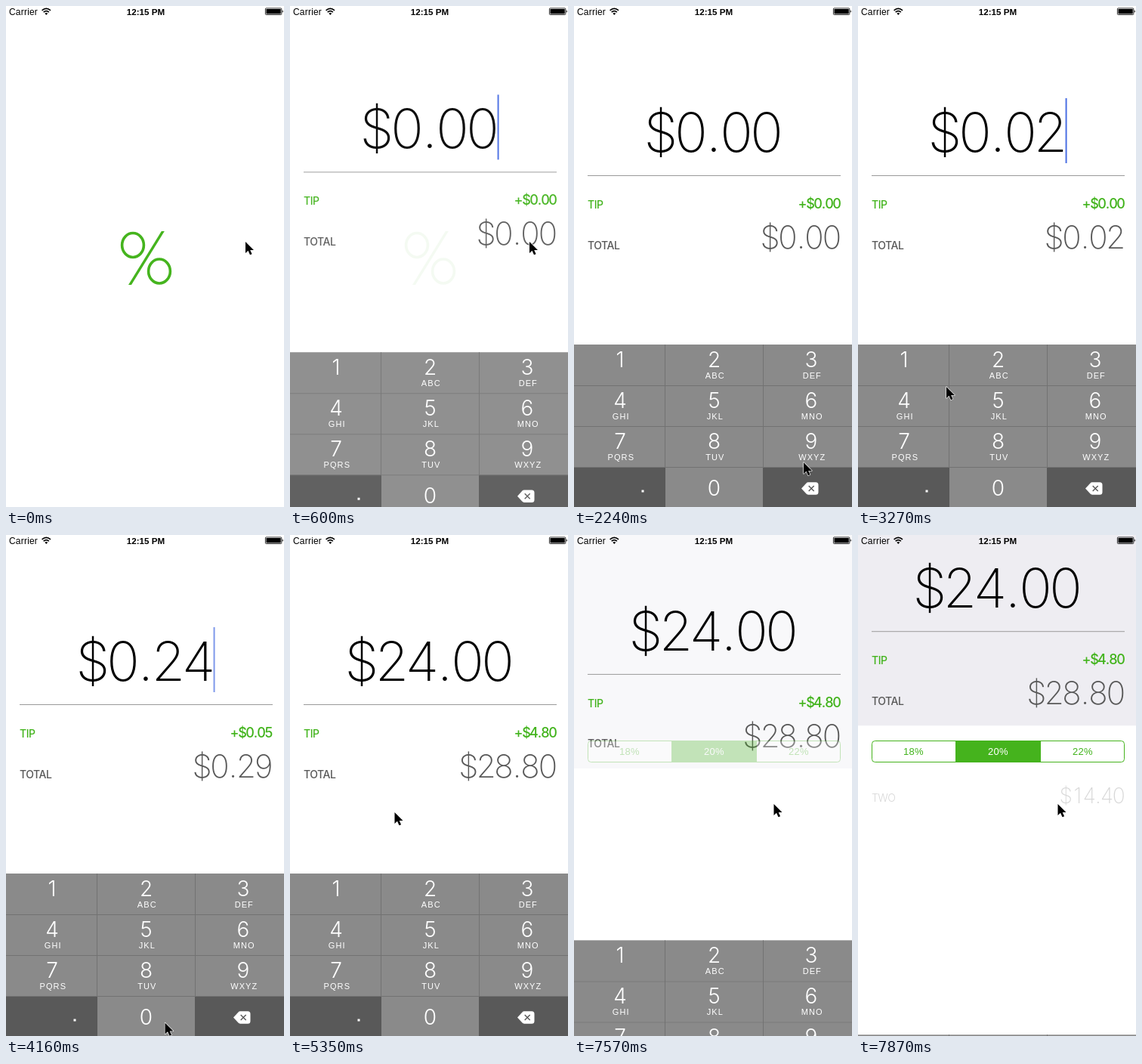
Recreate the animation shown at these times as an HTML page. Size 368 by 663 pixels, loop 8 s.

```html
<!DOCTYPE html>
<html lang="en">
<head>
<meta charset="utf-8">
<title>Tip calculator</title>
<style>
  html, body { margin: 0; width: 100%; height: 100%; overflow: hidden; background: #fff; }
  svg { display: block; width: 368px; height: 663px; }
  text { font-family: Inter, Roboto, sans-serif; white-space: pre; }
  .sans { font-family: "Liberation Sans", Arial, sans-serif; }
  .money, .mid { text-anchor: middle; }
  .label { font-size: 14px; font-weight: 500; letter-spacing: -.45px; }
  .green { fill: #41b31b; }
  .gray { fill: #585858; }
  .digit { font-size: 28px; font-weight: 300; fill: #fff; text-anchor: middle; }
  .letters { font-size: 11px; letter-spacing: 1.1px; fill: #fff; text-anchor: middle; }
  .seg { font-size: 13px; letter-spacing: .3px; text-anchor: middle; }
</style>
</head>
<body>
<svg viewBox="0 0 368 663">
  <rect width="368" height="663" fill="#fff"/>

  <g id="content">
    <rect id="panel" width="368" height="349" fill="#eeedf2"/>
    <text id="amount" class="money" y="193" font-size="72" font-weight="160"/>
    <rect id="caret" y="122" width="2" height="86" fill="#4a6fe3"/>
    <path d="M18 224.5H353" stroke="#9a9a9a"/>
    <text class="label green" x="18" y="268">TIP</text>
    <text id="tip" class="money green" y="268" font-size="18" font-weight="500"/>
    <text class="label gray" x="18" y="321.5">TOTAL</text>
    <text id="total" class="money gray" y="321" font-size="42" font-weight="200"/>
  </g>

  <g id="choice">
    <rect x="18.5" y="272.5" width="334" height="28" rx="4" fill="#fff" stroke="#45b31d"/>
    <rect x="129" y="272" width="113" height="29" fill="#45b31d"/>
    <text class="seg sans green" x="73.5" y="291">18%</text>
    <text class="seg sans" x="185.5" y="291" fill="#fff">20%</text>
    <text class="seg sans green" x="297.5" y="291">22%</text>
  </g>
  <g id="split">
    <text class="gray" x="18" y="352.5" font-size="14" font-weight="300" letter-spacing="-.6">TWO</text>
    <text id="share" class="money gray" y="355" font-size="28" font-weight="200"/>
  </g>

  <g id="pad"></g>

  <g id="launch">
    <rect width="368" height="663" fill="#fff"/>
    <g fill="none" stroke="#45b41e" stroke-width="3.6">
      <ellipse cx="168" cy="316.5" rx="14.4" ry="16"/>
      <ellipse cx="203" cy="351" rx="14.4" ry="16"/>
    </g>
    <path d="M162 369L205.8 298H209.8L166 369Z" fill="#45b41e"/>
  </g>

  <text class="sans" x="4" y="11.5" font-size="12" letter-spacing=".2">Carrier</text>
  <g fill="none" stroke="#000" stroke-width="1.7">
    <path d="M47.6 5.8Q53.3 .8 59 5.8"/>
    <path d="M49.7 8.2Q53.3 5 56.9 8.2"/>
  </g>
  <path d="M51.3 9.8Q53.3 8.2 55.3 9.8L53.3 12Z"/>
  <text class="sans mid" x="185" y="11.5" font-size="11.6" font-weight="700">12:15 PM</text>
  <rect x="343.4" y="2.9" width="21.4" height="8.6" rx="1" fill="none" stroke="#000" stroke-width=".8"/>
  <rect x="344.5" y="4" width="19.2" height="6.4"/>
  <path d="M365.7 5.3Q368 7.2 365.7 9.1Z"/>

  <path id="mouse" d="M0 0V15L3.5 11.8L6 17.3L8.6 16.2L6.2 11H11Z" stroke="#fff" stroke-width="1.2" stroke-linejoin="round" paint-order="stroke"/>
</svg>
<script>
const LOOP = 8000, TICK = 148.5;
const PAD_H = 216, LIFT = 98, TAU = 77;
const SHOW = 359, HIDE = 7533;
const LIGHT = '#8a8a8a', DARK = '#595959';

const $ = id => document.getElementById(id);
const clamp = v => Math.max(0, Math.min(1, v));
const settle = (t, from) => t < from ? 0 : 1 - Math.exp((from - t) / TAU);

// Key presses in ticks: tick, key, amount in cents afterwards
const presses = [[20, '2', 2], [24, '4', 24], [29, '0', 240], [31, '0', 2400]];

// Pointer path: tick, x, y
const path = [
  [0, 317, 312], [4, 317, 312], [7, 311, 420], [12, 308, 623], [15, 304, 604],
  [16, 288, 585], [18, 174, 480], [20, 174, 480], [24, 60, 528], [25, 84, 552],
  [27, 205, 640], [28, 210.5, 645.5], [33, 210.5, 645.5], [35, 165, 460],
  [36, 138.5, 367], [37, 138.5, 367], [39, 123, 374], [41, 180, 377],
  [43, 302, 360], [45, 274, 348], [46, 274, 348], [47, 273.5, 347],
  [50, 264.5, 356], [54, 264.5, 356]
];

const letters = ['', 'ABC', 'DEF', 'GHI', 'JKL', 'MNO', 'PQRS', 'TUV', 'WXYZ'];
const cols = [[0, 121, 61], [121, 129, 185.5], [250, 118, 314]];

function buildPad() {
  let s = '';
  const key = (name, col, row, fill) => {
    const [x, w] = cols[col];
    s += `<rect id="key${name}" x="${x}" y="${448 + row * 54}" width="${w}" height="54" fill="${fill}"/>`;
  };
  const digit = (d, x, y) => s += `<text class="digit" x="${x}" y="${y}">${d}</text>`;
  letters.forEach((_, i) => key(i + 1, i % 3, Math.floor(i / 3), LIGHT));
  key('Dot', 0, 3, DARK);
  key('0', 1, 3, LIGHT);
  key('Del', 2, 3, DARK);
  s += '<path d="M0 502.5H368M0 556.5H368M0 610.5H368M120.5 448V610M250.5 448V610" stroke="#727272"/>';
  letters.forEach((l, i) => {
    const x = cols[i % 3][2], y = 478 + Math.floor(i / 3) * 54;
    digit(i + 1, x, y);
    s += `<text class="letters sans" x="${x + 1.3}" y="${y + 15}">${l}</text>`;
  });
  digit(0, 185.5, 647.5);
  s += '<rect x="89.5" y="640.5" width="3" height="3" fill="#fff"/>';
  s += '<path d="M301 638.5L307.5 631.4Q308.4 630.3 310 630.3H320Q323.5 630.3 323.5 633.8V643.2Q323.5 646.7 320 646.7H310Q308.4 646.7 307.5 645.6Z" fill="#fff"/>';
  s += `<path d="M310.7 635l7 7m0-7l-7 7" stroke="${DARK}" stroke-width="1.4"/>`;
  $('pad').innerHTML = s;
}

// Sets each figure in the middle of its own cell; align 0 = left, .5 = centre, 1 = right
function money(id, str, x, align) {
  const el = $(id), size = +el.getAttribute('font-size');
  const widths = [...str].map(c => size * (c === '.' ? .278 : c === '+' ? .6 : .556));
  const sum = widths.reduce((a, b) => a + b, 0);
  let left = x - sum * align;
  el.setAttribute('x', widths.map(w => (left += w) - w / 2).join(' '));
  el.textContent = str;
  return left;
}

const dollars = cents => '$' + (cents / 100).toFixed(2);

function pointerAt(n) {
  const i = path.findIndex(p => p[0] > n);
  const [a, ax, ay] = path[i - 1], [b, bx, by] = path[i];
  const k = (n - a) / (b - a);
  return [ax + (bx - ax) * k, ay + (by - ay) * k];
}

function blink(t, from) {
  const p = (t - from) % 1000;
  return p > 950 ? 1 : clamp((700 - p) / 150);
}

function render(n) {
  const t = n * TICK;
  const gone = settle(t, HIDE);
  const off = 1 - settle(t, SHOW) + gone;

  $('content').setAttribute('transform', `translate(0 ${-LIFT * off})`);
  $('pad').setAttribute('transform', `translate(0 ${PAD_H * off})`);
  $('panel').setAttribute('opacity', clamp(gone * 1.02));
  $('launch').setAttribute('opacity', clamp((610 - t) / 310));
  $('choice').setAttribute('opacity', clamp((t - 7500) / 250));
  $('split').setAttribute('opacity', clamp((t - 7790) / 350));

  const last = presses.filter(p => p[0] <= n).pop();
  const cents = last ? last[2] : 0, tip = Math.round(cents * .2);
  const end = money('amount', dollars(cents), 185, .5);
  money('tip', '+' + dollars(tip), 353, 1);
  money('total', dollars(cents + tip), 353, 1);

  $('caret').setAttribute('x', end - .5);
  $('caret').setAttribute('opacity', t > HIDE ? 0 : blink(t, last ? last[0] * TICK : 350));

  for (const k of ['2', '4', '0'])
    $('key' + k).setAttribute('fill', last && last[0] === n && last[1] === k ? DARK : LIGHT);

  $('mouse').setAttribute('transform', `translate(${pointerAt(n)})`);
}

buildPad();
money('share', '$14.40', 353, 1);

const start = performance.now();
let shown = -1;
function frame() {
  const t = (performance.now() - start) % LOOP;
  const n = Math.floor((t + 4) / TICK);
  if (n !== shown) render(shown = n);
  requestAnimationFrame(frame);
}
frame();
</script>
</body>
</html>
```
